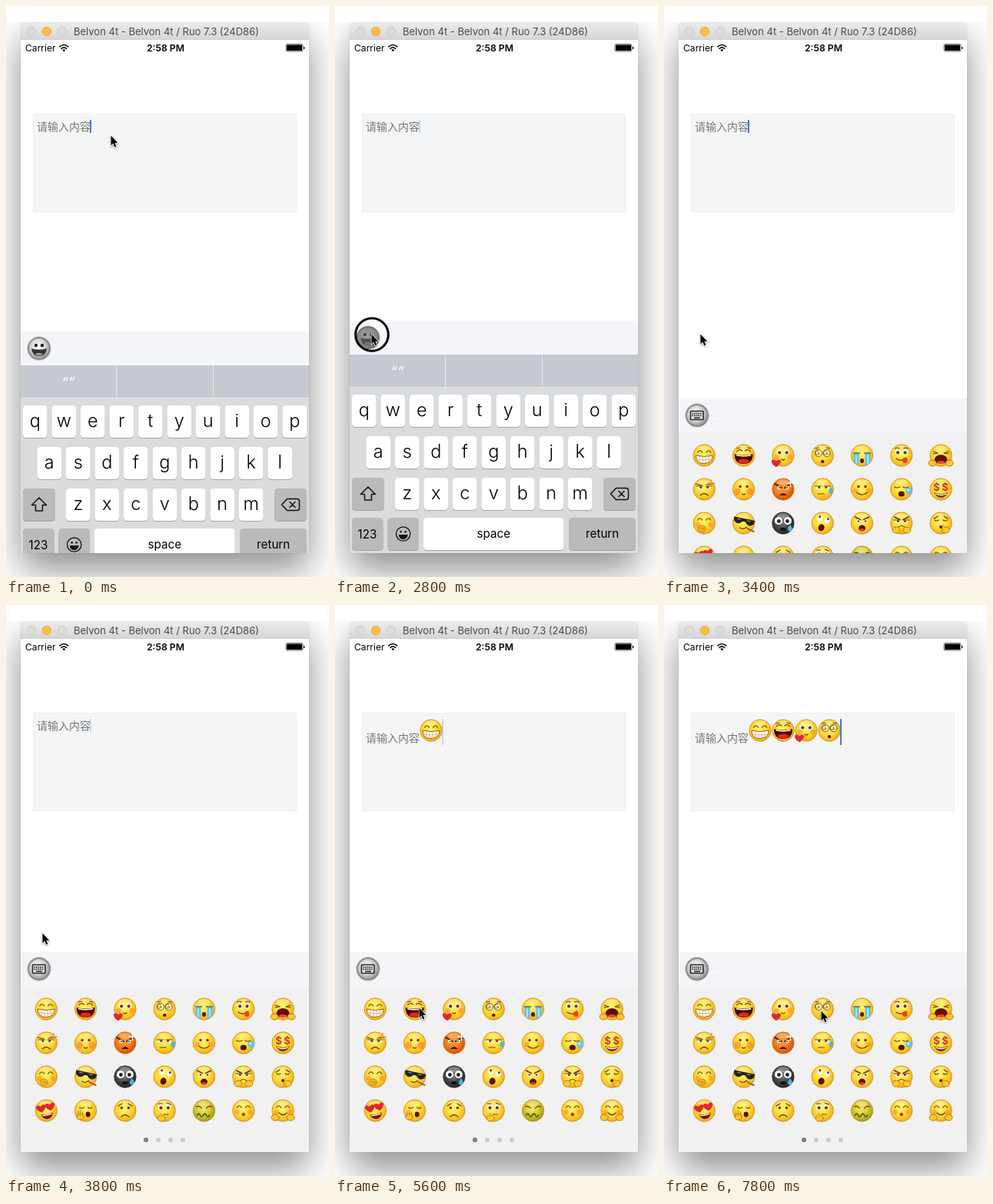
Recreate the animation shown at these times as an HTML page. Size 420 by 742 pixels, loop 8 s.

```html
<!DOCTYPE html>
<html lang="zh-CN">
<head>
<meta charset="utf-8">
<title>Emoji keyboard</title>
<style>
  html, body { margin: 0; width: 100%; height: 100%; overflow: hidden; background: #fff; }
  #window {
    position: absolute; left: 19px; top: 22px; width: 375px; height: 689px;
    border-radius: 5px 5px 0 0; background: #fff;
    box-shadow: 0 0 1px rgba(0,0,0,.4), 0 21px 48px rgba(0,0,0,.45);
  }
  #top { position: absolute; left: 0; top: 0; width: 100%; height: 21px; background: #fff; }
  svg { position: absolute; left: 0; top: 0; }
  text { font-family: Inter, 'Liberation Sans', sans-serif; }
  .cjk { font: 300 14px 'Noto Sans CJK SC', 'Noto Sans CJK', sans-serif; }
  .letter { font-size: 23.5px; font-weight: 300; text-anchor: middle; }
  .label { font-size: 15.2px; text-anchor: middle; }
</style>
</head>
<body>
<div id="window"></div>
<div id="top"></div>
<svg id="stage" width="420" height="742" viewBox="0 0 420 742"></svg>
<script>
const LOOP = 8000, STEP = 200;
const INK = '#6b3505';

// Drawing helpers
const line = (d, c = INK, w = 1.2) =>
  `<path d="${d}" fill="none" stroke="${c}" stroke-width="${w}" stroke-linecap="round" stroke-linejoin="round"/>`;
const fill = (d, c = INK) => `<path d="${d}" fill="${c}"/>`;
const dot = (x, y, r, c = INK) => `<circle cx="${x}" cy="${y}" r="${r}" fill="${c}"/>`;
const pair = (x, y, r, c) => dot(-x, y, r, c) + dot(x, y, r, c);
const rect = (x, y, w, h, c, r = 0, more = '') =>
  `<rect x="${x}" y="${y}" width="${w}" height="${h}" rx="${r}" fill="${c}" ${more}/>`;
const text = (x, y, s, attrs) => `<text x="${x}" y="${y}" ${attrs}>${s}</text>`;
const at = (x, y, body, id = '') => `<g ${id && `id="${id}"`} transform="translate(${x} ${y})">${body}</g>`;
const tilt = (deg, body) => `<g transform="rotate(${deg})">${body}</g>`;
const radial = (id, ...stops) => `<radialGradient id="${id}" cx=".45" cy=".42" r=".6">` +
  stops.map((c, i) => `<stop offset="${i / (stops.length - 1)}" stop-color="${c}"/>`).join('') + '</radialGradient>';

// Face parts
const happyEyes = line('M-8.5-4q3-4.5 6 0M2.5-4q3-4.5 6 0');
const flatEyes = fill('M-10-4h8q-1 4-4 4t-4-4zM2-4h8q-1 4-4 4t-4-4z', '#fff') +
  line('M-10-4h8M2-4h8') + pair(4.5, -2.4, 1.5);
const bigEyes = pair(5, -4, 3.4, '#fff') + pair(4.7, -3.6, 2.1);
const dotEyes = pair(4.5, -3.5, 1.7);
const angryBrows = line('M-9-8l7 3.5M9-8l-7 3.5', INK, 1.6);
const sadBrows = line('M-9-6l5-3M9-6l-5-3');
const smile = line('M-7 4q7 6 14 0');
const frown = line('M-5 8q5-5 10 0');
const cheeks = pair(8.5, 2, 3.2, '#ff7b3a80');
const heart = (x, y, k) => `<path transform="translate(${x} ${y}) scale(${k})" fill="#e3262b" d="M0 4C-8-1-4-6 0-2C4-6 8-1 0 4Z"/>`;
const hand = (x, y) => `<ellipse cx="${x}" cy="${y}" rx="5" ry="4" fill="#ffc928" stroke="#b86a08" stroke-width=".9"/>`;
const cross = (c) => line('M5-8h9M9.5-12.5v9', c, 1.5);
const drop = (x, y) => fill(`M${x} ${y}q6 7 0 9q-6-2 0-9z`, '#48b8ea');
const spiral = x => `<circle cx="${x}" cy="-3" r="4.6" fill="#fff4b0" stroke="${INK}" stroke-width=".8"/>` +
  line(`M${x - 1}-3q1-1.5 2 0t-2.4 2t-2.4-3t4-2`, INK, .8);
const mouth = (x, y, rx, ry, c = '#5b0d04') => `<ellipse cx="${x}" cy="${y}" rx="${rx}" ry="${ry}" fill="${c}"/>`;
const dollar = x => text(x, 2, '$', 'fill="#d8321c" font-size="13" font-weight="700" text-anchor="middle"');

const faces = [
  happyEyes + `<path d="M-11 0q11 3 22 0q0 10-11 10.5t-11-10.5z" fill="#fff" stroke="#a65a08"/>` +
    line('M-10 5q10 2 20 0M-6 1v7.5M-2 1.5v8.5M2 1.5v8.5M6 1v7.5', '#c9a070', .7),
  line('M-9-5q3-4 7-1M9-5q-3-4-7-1M-9-9l4-1M9-9l-4-1') + fill('M-12-2q12 3 24 0q0 13-12 13t-12-13z', '#4a0802') +
    mouth(0, 7.5, 7, 3, '#e3271d') + line('M-9-.3q9 2 18 0', '#fff', 1.5),
  bigEyes + cheeks + line('M-2 5q2 2 4 0') + heart(-9, 10, 1.3),
  spiral(-5.3) + spiral(5.3) + mouth(0, 8, 2.3, 2) + line('M-9-9l4-1M9-9l-4-1'),
  fill('M-11-2h7v15l-7-4zM11-2h-7v15l7-4z', '#5cc4ee') + line('M-11-3h8M11-3h-8', '#3d6a80', 1.3) +
    line('M-7.5 0v10M7.5 0v10', '#c8effc', 1.5) + mouth(0, 7, 2.5, 3),
  bigEyes + line('M-8-9q3-2 5 0M3-9q3-2 5 0') + line('M-7 4q7 5 13-1') + mouth(4.5, 6.5, 3.3, 3.6, '#ef3d25'),
  line('M-10-5l6 2l-6 1M10-5l-6 2l6 1') + fill('M-9 10q0-11 9-11t9 11z', '#650c03') +
    mouth(0, 9, 5, 2, '#ec4a2e') + hand(-11, 10) + hand(11, 10),
  flatEyes + line('M-11-7l8 2M11-7l-8 1') + frown + cross('#f09a3c'),
  dotEyes + pair(8, 3, 4.5, '#ff6a2b80') + line('M-2 6q2 2 4 0'),
  line('M-11-7l9 5M11-7l-9 5', '#4a1502', 2) + pair(5.5, -2, 2.2, '#fff') + pair(5, -2, 1.1) +
    fill('M-5 8q5-6 10 0z', '#4a1502') + cross('#fff'),
  flatEyes + line('M-6 6h8') + drop(11, -3),
  dotEyes + smile + cheeks,
  line('M-9-3q3 2 7 0M2-3q3 2 7 0') + mouth(0, 6, 4, 3.6) + dot(10, 2, 4.6, '#63c5ed') + dot(9, 1, 1.6, '#d9f4ff'),
  dollar(-5.5) + dollar(5.5) + fill('M-9 4q9 4 18 0q-3 7-9 7t-9-7z') + line('M-7 6q7 3 14 0', '#fff', 1.3),
  happyEyes + cheeks + hand(-3, 7) + line('M-6 6h6M-5 8h6', '#b86a08', .8),
  tilt(12, fill('M-14-6h28l-1 5q-6 6-11-1h-4q-5 7-11 1z', '#222') + line('M-9-4h4M4-4h4', '#999')) +
    line('M-5 6q5 3 9-1') + line('M5 7l8 4', '#a8661c', 2),
  pair(6, -3, 5, '#fff') + pair(5.5, -2.5, 2.4, '#222') + mouth(0, 8, 4, 2, '#111') + drop(9, 2),
  tilt(15, pair(5, -5, 3.5, '#fff') + pair(5.5, -7, 1.5) + mouth(0, 6, 4, 4.5)),
  angryBrows + pair(5, -2.5, 2.2, '#fff') + pair(4.6, -2.5, 1.3) + mouth(0, 6.5, 4.5, 4) + mouth(0, 8.5, 3, 1.5, '#ea3d20'),
  flatEyes + angryBrows + line('M-4 5q4-3 8 0') + hand(-7, 9) + hand(7, 9),
  line('M-8-4q2 2 5 0M3-4q2 2 5 0') + sadBrows + mouth(0, 5, 2, 2) + hand(6, 9) + line('M3 9V3', '#f6b51b', 2.5),
  tilt(-12, heart(-6, -4, 1.35) + heart(6, -4, 1.35) + fill('M-8 4q8 2 16 0q-2 7-8 7t-8-7z', '#7b1205') + line('M-6 5.5q6 1 12 0', '#fff', 1.3)),
  line('M-8-4q3 2 6 0M3-4q3 2 5 0') + mouth(3, 5, 3, 3.4) + hand(-7, 8) + line('M-10 7V1M-7 6V0M-4 7V2', '#d68d0c', 1.4),
  dotEyes + sadBrows + frown,
  bigEyes + line('M-8-9h5M3-10l5 2') + line('M-1 5h6') + hand(-4, 10) + line('M-5 8V4', '#f6b51b', 2.5),
  line('M-10-5q4-2 7 2M10-5q-4-2-7 2') + line('M-9 6q2-4 4 0t4 0t4 0t4 0', '#4f6a0c', 1.8),
  happyEyes + cheeks + mouth(0, 5, 2.2, 2.2, '#b73210'),
  happyEyes + cheeks + line('M-5 3q5 5 10 0') + hand(-10, 9) + hand(10, 9),
];
const skins = { 9: 'red', 16: 'dark', 25: 'green' };
const face = i => `<circle r="14.2" fill="url(#${skins[i] || 'yellow'})" stroke="${i === 16 ? '#333' : '#cf8a10'}" stroke-width=".8"/>` +
  `<ellipse cy="-9.5" rx="8" ry="3.5" fill="#fff" opacity=".3"/>` + faces[i];

// Toolbar button with its icon, origin at the toolbar's top left
const button = icon => rect(19, 0, 375, 44, '#f3f5f8') + dot(43, 22, 16, '#0002') +
  `<circle cx="43" cy="22" r="14" fill="url(#metal)" stroke="#7d7d7d" stroke-width="1.4"/>` + icon +
  [63, 67, 71].map(x => dot(x, 26, 1, '#fff')).join('');
const smileIcon = at(43, 22, pair(4, -4, 2.2, '#222') + fill('M-10 0q10 3 20 0q-1 10-10 10t-10-10z', '#333') + mouth(0, 7.5, 4.5, 1.7, '#999'));
const keysIcon = `<rect x="34.5" y="16.5" width="16.5" height="11" rx="1" fill="#eee" stroke="#222" stroke-width="1.6"/>` +
  `<path d="M36.5 19.7h13M36.5 22.3h13" stroke="#222" stroke-width="1.7" stroke-dasharray="1.7 .9"/>` + line('M39.5 25.2h7', '#222', 1.5);

// Letter keyboard, resting position in stage coordinates
const key = (x, y, w, c = '#fff') => rect(x, y + 1, w, 42, '#a2a3a5', 4.5) + rect(x, y, w, 42, c, 4.5);
const row = (letters, x, y) => [...letters].map((ch, i) =>
  key(x + 37.5 * i, y, 31.5) + text(x + 37.5 * i + 15.75, y + 27.5, ch, 'class="letter"')).join('');
const GREY = '#b9babb';
const letters = at(0, 409, button(smileIcon + `<circle id="pressed" cx="43" cy="22" r="15" fill="#000" opacity="0"/>`)) +
  rect(19, 453, 375, 258, '#dadbdc') + rect(19, 453, 375, 42, '#c4cacf') +
  rect(143, 453, 1, 42, '#e4e7e9') + rect(269, 453, 1, 42, '#e4e7e9') + rect(19, 495, 375, 1, '#e6e7e8') +
  text(81, 482, '“”', 'fill="#fff" font-size="18" font-style="italic" text-anchor="middle"') +
  row('qwertyuiop', 22, 505) + row('asdfghjkl', 40.5, 559) + row('zxcvbnm', 78, 613) +
  key(22, 613, 42, GREY) + line('M43 625l9.5 9.5h-5v7.5h-9v-7.5h-5z', '#111', 1.5) +
  key(349, 613, 42, GREY) + line('M358.5 634l7-7.5h13q3 0 3 3v9q0 3-3 3h-13zM369 630.5l7 7m0-7l-7 7', '#111', 1.5) +
  key(22, 665, 40.5, GREY) + text(42, 691.5, '123', 'class="label"') +
  key(68.5, 665, 40.5, GREY) + `<circle cx="88.7" cy="686" r="9.2" fill="none" stroke="#111" stroke-width="1.3"/>` +
  at(88.7, 686, pair(3, -2.8, 1.3, '#111') + fill('M-6 1h12q-1 6-6 6t-6-6z', '#111')) +
  key(115, 665, 182.5) + text(206.3, 691, 'space', 'class="label"') +
  key(304, 665, 87, GREY) + text(347.7, 691, 'return', 'class="label"');

const emojis = rect(19, 495, 375, 216, '#f1f1f2') + at(0, 451, button(keysIcon)) +
  faces.map((_, i) => at(52.3 + 51.3 * (i % 7), 525 + 44 * Math.floor(i / 7), face(i))).join('') +
  [0, 1, 2, 3].map(i => dot(182 + 16 * i, 695, 3.1, i ? '#cbced1' : '#71828a')).join('');

const titleBar = `<path d="M19 43V27q0-5 5-5h365q5 0 5 5v16z" fill="url(#bar)"/>` + rect(19, 43, 375, .8, '#c4c4c4') +
  [33, 53, 73].map((x, i) => `<circle cx="${x}" cy="33" r="5.7" fill="${i === 1 ? '#fdbd3e' : '#dcdcdc'}" stroke="${i === 1 ? '#e2a434' : '#c3c3c3'}" stroke-width=".8"/>`).join('') +
  text(88, 38, 'Belvon 4t - Belvon 4t / Ruo 7.3 (24D86)', 'font-size="13" fill="#4b4b4b"');

const statusBar = text(25, 59, 'Carrier', 'font-size="12.1"') +
  text(207.5, 59, '2:58 PM', 'font-size="12.2" font-weight="600" text-anchor="middle"') +
  line('M69.8 52.8q5.5-4.6 11 0M72 55.3q3.3-2.8 6.6 0', '#000', 1.6) + fill('M73.3 57q2-1.6 4 0l-2 2.3z', '#000') +
  rect(364, 49.6, 22, 9.4, 'none', 1.8, 'stroke="#000" stroke-width=".6"') +
  rect(365, 50.6, 20, 7.4, '#000', .8) + rect(387, 53, 1.4, 3, '#000', .7);

document.getElementById('stage').innerHTML = `<defs>
  ${radial('yellow', '#fff27a', '#ffdf35', '#f2a818')}
  ${radial('red', '#ffa340', '#f58220', '#cf4a08')}
  ${radial('dark', '#8a8a8a', '#4c4c4c', '#242424')}
  ${radial('green', '#f4ea70', '#dccb2f', '#9a9a18')}
  ${radial('metal', '#ffffff', '#dedede', '#8c8c8c')}
  <linearGradient id="bar" x2="0" y2="1"><stop stop-color="#ebebeb"/><stop offset="1" stop-color="#d6d6d6"/></linearGradient>
  <clipPath id="screen"><rect x="19" y="43" width="375" height="668"/></clipPath></defs>
  ${titleBar}${statusBar}
  ${rect(35.5, 140.5, 342, 127, '#f4f5f7', 0, 'stroke="#eceef0"')}
  <text id="field" class="cjk" x="40" y="162" fill="#777">请输入内容</text>
  ${[0, 1, 2, 3].map(i => at(125 + 30 * i, 163, face(i), 'typed' + i)).join('')}
  <rect id="caret" width="2" fill="#4779d4"/>
  <g clip-path="url(#screen)"><g id="letters">${letters}</g><g id="emojis">${emojis}</g></g>
  <circle id="ring" r="21.3" fill="#fff" fill-opacity=".25" stroke="#000" stroke-width="3"/>
  <path id="cursor" d="M.5 .5V13.3L3.4 10.5L5.3 15.3L7.4 14.4L5.4 9.8H9.3Z" stroke="#fff" stroke-width="1.4" paint-order="stroke"
    style="filter:drop-shadow(0 1px 1px rgba(0,0,0,.4))"/>`;

// Motion tables
const path = [[1400, 136, 168], [2400, 47, 426], [3800, 47, 426], [4400, 52, 526], [5000, 52, 526],
  [5600, 109, 523], [6200, 109, 523], [6600, 155, 525], [7000, 155, 525], [7400, 204, 527]];
const clicks = [2800, 4600, 5800, 6800, 7600];
const inserts = [4800, 6000, 7000, 7800];
const caretResets = [0, 3000, ...inserts];
const caretFade = [1, 1, 1, 1, .25, .1, 0, 0, .4, .8];
const lettersDrop = [[0, 14], [200, 2], [400, 0], [3000, 170], [3200, 320]];
const emojisDrop = [[0, 280], [3200, 180], [3400, 59], [3600, 14], [3800, 0]];

const held = (table, t) => table.filter(k => k[0] <= t).pop()[1];
const $ = id => document.getElementById(id);
const set = (id, attrs) => { for (const k in attrs) $(id).setAttribute(k, attrs[k]); };

function cursorAt(t) {
  const n = path.findIndex(p => p[0] > t);
  if (n === 0) return path[0].slice(1);
  if (n < 0) return path[path.length - 1].slice(1);
  const [a, b] = [path[n - 1], path[n]];
  const u = (t - a[0]) / (b[0] - a[0]), e = u * u * (3 - 2 * u);
  return [a[1] + (b[1] - a[1]) * e, a[2] + (b[2] - a[2]) * e];
}

function draw(t) {
  const [x, y] = cursorAt(t), count = inserts.filter(i => i <= t).length;
  const sinceReset = t - caretResets.filter(r => r <= t).pop();
  set('cursor', { transform: `translate(${x} ${y})` });
  set('ring', { cx: x + 1, cy: y + 1, visibility: clicks.includes(t) ? 'visible' : 'hidden' });
  set('pressed', { opacity: t === clicks[0] ? .5 : 0 });
  set('letters', { transform: `translate(0 ${held(lettersDrop, t)})` });
  set('emojis', { transform: `translate(0 ${held(emojisDrop, t)})` });
  set('field', { y: count ? 178 : 162 });
  set('caret', { x: 109 + 30 * count, y: 148, height: count ? 34 : 17, opacity: caretFade[sinceReset / STEP % 10] });
  inserts.forEach((_, i) => set('typed' + i, { visibility: i < count ? 'visible' : 'hidden' }));
}

const start = performance.now();
function tick() {
  const t = (performance.now() - start) % LOOP;
  draw(Math.floor(t / STEP) * STEP);
  requestAnimationFrame(tick);
}
tick();
</script>
</body>
</html>
```
